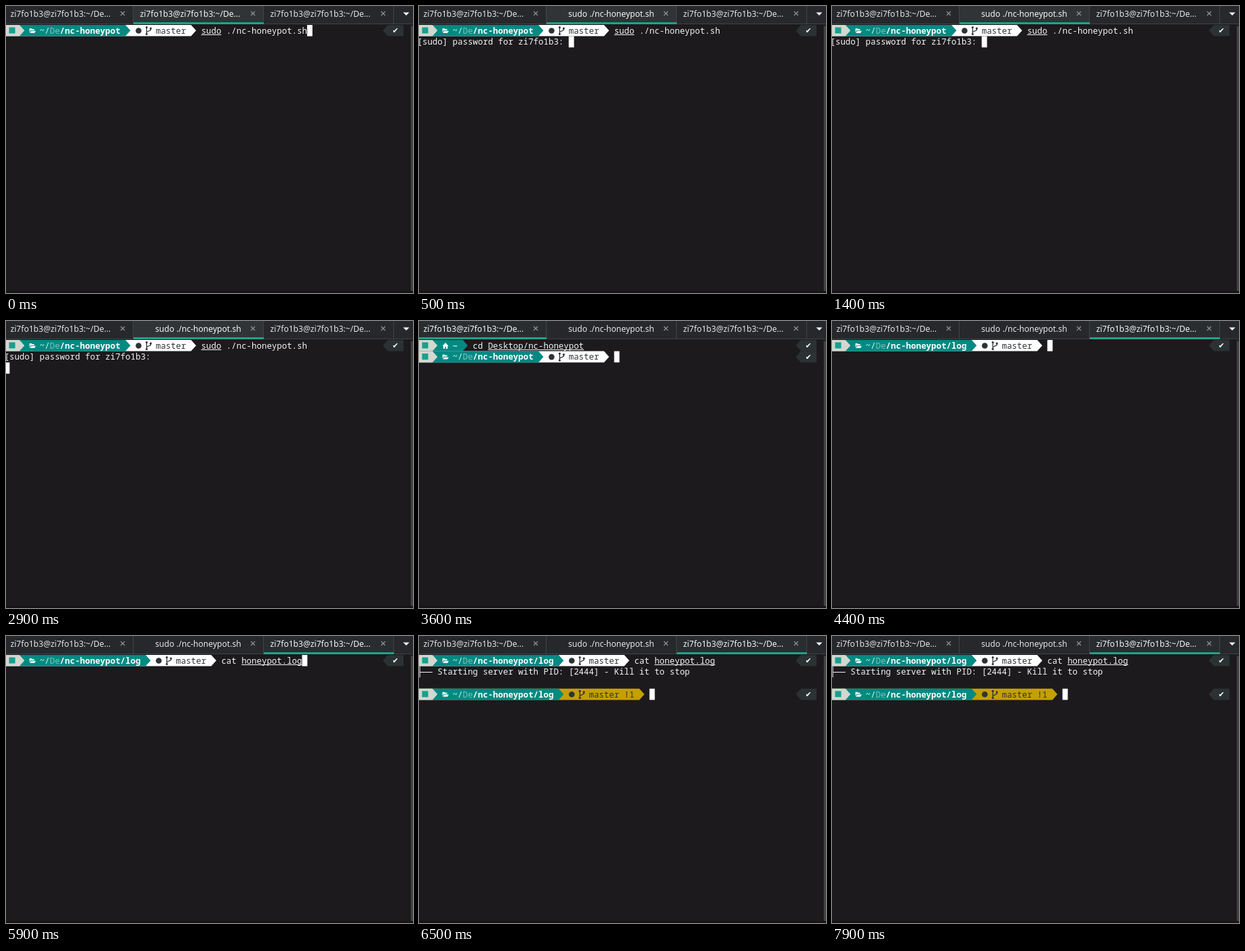
An HTML page with a canvas for the animation above (8 s loop, 600x424 px).

```html
<!DOCTYPE html>
<html lang="en">
<head>
<meta charset="utf-8">
<style>
html, body { margin: 0; width: 100%; height: 100%; overflow: hidden; background: #1c1a1d; }
canvas { display: block; }
</style>
</head>
<body>
<canvas id="stage" width="600" height="424"></canvas>
<script>
const ctx = document.getElementById('stage').getContext('2d');
const LOOP = 8000, CELL = 7.44, ROW = 16.6, LEFT = -2.5, TOP = 28;
const TEAL = '#008a82', GREY = '#d3d7cf', INK = '#2e3436', GOLD = '#c4a000', WHITE = '#fff';
const BACK = '#1c1a1d', BAR = '#26282b', EDGE = '#424548';
const USER = 'zi7fo1b3';
const SHELL = `${USER}@${USER}:~/De...`;
const COMMAND = 'sudo ./nc-honeypot.sh';
const READ = 'cat honeypot.log';

const colX = col => LEFT + col * CELL;
const rowY = row => TOP + row * ROW;

function rect(x, y, w, h, color) {
  ctx.fillStyle = color;
  ctx.fillRect(x, y, w, h);
}

function poly(color, ...points) {
  ctx.fillStyle = color;
  ctx.beginPath();
  points.forEach(([x, y]) => ctx.lineTo(x, y));
  ctx.fill();
}

function dot(x, y, r, color) {
  ctx.fillStyle = color;
  ctx.beginPath();
  ctx.arc(x, y, r, 0, 7);
  ctx.fill();
}

function line(color, width, ...points) {
  ctx.strokeStyle = color;
  ctx.lineWidth = width;
  ctx.beginPath();
  points.forEach(([x, y]) => ctx.lineTo(x, y));
  ctx.stroke();
}

// Each glyph sits in its own terminal cell.
function write(text, col, row, color = '#f4f4f4', bold = false) {
  ctx.font = `${bold ? 'bold ' : ''}12.4px "Noto Sans Mono", "DejaVu Sans Mono", monospace`;
  ctx.fillStyle = color;
  [...text].forEach((ch, i) => ctx.fillText(ch, colX(col + i), rowY(row) + 12.8));
}

function underline(col, row, count) {
  if (count > 0) rect(colX(col), Math.round(rowY(row) + 14), count * CELL, 1, '#f4f4f4');
}

function cursor(col, row) {
  rect(colX(col), rowY(row), CELL + 0.4, ROW, WHITE);
}

// Background from column 0 to an arrow head that fills one cell.
function segment(tip, row, color) {
  const y = rowY(row), x = colX(tip);
  poly(color, [0, y], [x, y], [x + CELL, y + ROW / 2], [x, y + ROW], [0, y + ROW]);
}

function homeIcon(row) {
  const x = 34.5, y = rowY(row) + 4;
  poly(WHITE, [x, y + 5], [x + 4.5, y], [x + 9, y + 5], [x + 7.7, y + 5], [x + 7.7, y + 9], [x + 1.3, y + 9], [x + 1.3, y + 5]);
  rect(x + 3.7, y + 6, 1.6, 3, TEAL);
}

function folderIcon(row) {
  const x = 34.5, y = rowY(row) + 5;
  poly('#eef5f4', [x, y], [x + 3, y], [x + 4, y + 1], [x + 7, y + 1], [x + 7, y + 3], [x + 2, y + 3], [x, y + 6]);
  poly('#eef5f4', [x + 2.5, y + 3.8], [x + 9.5, y + 3.8], [x + 7.5, y + 7], [x + 0.5, y + 7]);
}

function branchIcon(col, row) {
  const x = colX(col) + 1.5, y = rowY(row) + 3.5;
  line(INK, 1.3, [x, y], [x, y + 9.5]);
  line(INK, 1.3, [x + 6, y + 2], [x + 6, y + 4], [x, y + 7]);
  for (const [dx, dy] of [[0, 0], [6, 1.5], [0, 10]]) dot(x + dx, y + dy, 1.6, INK);
}

function status(row) {
  const y = rowY(row), x = colX(76);
  poly('#2b3234', [586, y], [x, y], [x - CELL, y + ROW / 2], [x, y + ROW], [586, y + ROW]);
  ctx.font = '11px "DejaVu Sans", sans-serif';
  ctx.fillStyle = WHITE;
  ctx.fillText('✔', 569.5, y + 12.4);
}

// Draws the prompt and returns the column where input starts.
function prompt(row, folder, branch, branchColor = WHITE) {
  const pathEnd = folder ? 13 + folder.length : 9;
  const end = pathEnd + branch.length + 7;
  if (folder) segment(end, row, branchColor);
  segment(pathEnd, row, TEAL);
  segment(3, row, GREY);
  rect(4.5, rowY(row) + 3.5, 9, 9, '#16a090');
  if (folder) {
    folderIcon(row);
    write('~/', 7, row, '#e4f0ef');
    write('De', 9, row, '#86bdb8');
    write('/' + folder, 11, row, WHITE, true);
    dot(colX(pathEnd + 2) + 4.5, rowY(row) + 8.5, 4.3, INK);
    branchIcon(pathEnd + 4, row);
    write(branch, pathEnd + 6, row, INK);
  } else {
    homeIcon(row);
    write('~', 7, row, WHITE, true);
  }
  status(row);
  return folder ? end + 2 : 11;
}

function tabs(active, running) {
  rect(0, 0, 600, 27, BAR);
  [0, 188, 380].forEach((x, i) => {
    const on = i === active;
    const job = i === 1 && running;
    if (on) rect(x, 0, 191, 27, i === 1 ? '#303437' : '#2a2d30');
    ctx.font = '12.1px "Noto Sans", sans-serif';
    ctx.fillStyle = on ? '#f6f6f6' : '#e6e6e6';
    ctx.fillText(job ? COMMAND : SHELL, job ? 220 : x + (i ? 9.5 : 6.5), 16);
    const cx = [172, 364, 556][i];
    line('#8d9092', 1.2, [cx - 3, 8], [cx + 3, 14]);
    line('#8d9092', 1.2, [cx + 3, 8], [cx - 3, 14]);
  });
  for (const x of [187, 379, 571]) rect(x, 0, 1, 27, EDGE);
  rect(0, 26, 600, 1, EDGE);
  rect(0, 27, 600, 1, '#17181a');
  rect([0, 188, 380][active], 24, active ? 192 : 188, 3, '#1fa38a');
  poly(WHITE, [585.5, 9.5], [594.5, 9.5], [590, 14]);
}

function serverTab(t) {
  const col = prompt(0, 'nc-honeypot', 'master');
  write(COMMAND, col, 0);
  underline(col, 0, 4);
  if (t < 100) return cursor(col + COMMAND.length, 0);
  const ask = `[sudo] password for ${USER}: `;
  write(ask, 0, 1);
  if (t < 2400) cursor(ask.length, 1);
  else cursor(0, 2);
}

function folderTab() {
  const col = prompt(0, '', '');
  write('cd Desktop/nc-honeypot', col, 0);
  underline(col + 3, 0, 19);
  cursor(prompt(1, 'nc-honeypot', 'master'), 1);
}

function logTab(t) {
  const col = prompt(0, 'nc-honeypot/log', 'master');
  const step = Math.floor((t - 4900) / 100);
  const typed = Math.max(0, Math.min(READ.length, Math.round(step * READ.length / 9)));
  write(READ.slice(0, typed), col, 0);
  underline(col + 4, 0, typed - 4);
  if (t < 6000) return cursor(col + typed, 0);
  const y = rowY(1), x = colX(0) + CELL / 2;
  line('#f4f4f4', 1, [x, y], [x, y + ROW]);
  line('#f4f4f4', 1, [x, y + 8.9], [colX(3), y + 8.9]);
  write('Starting server with PID: [2444] - Kill it to stop', 4, 1);
  cursor(prompt(3, 'nc-honeypot/log', 'master !1', GOLD), 3);
}

function draw(now) {
  const t = now % LOOP;
  const active = t < 3200 ? 1 : t < 4100 ? 0 : 2;
  rect(0, 0, 600, 424, BACK);
  [folderTab, serverTab, logTab][active](t);
  rect(596, 28, 4, 396, '#252426');
  rect(597, 30, 3, 391, '#434344');
  rect(0, 421, 600, 3, '#161216');
  tabs(active, t >= 100);
  requestAnimationFrame(draw);
}

requestAnimationFrame(draw);
</script>
</body>
</html>
```
